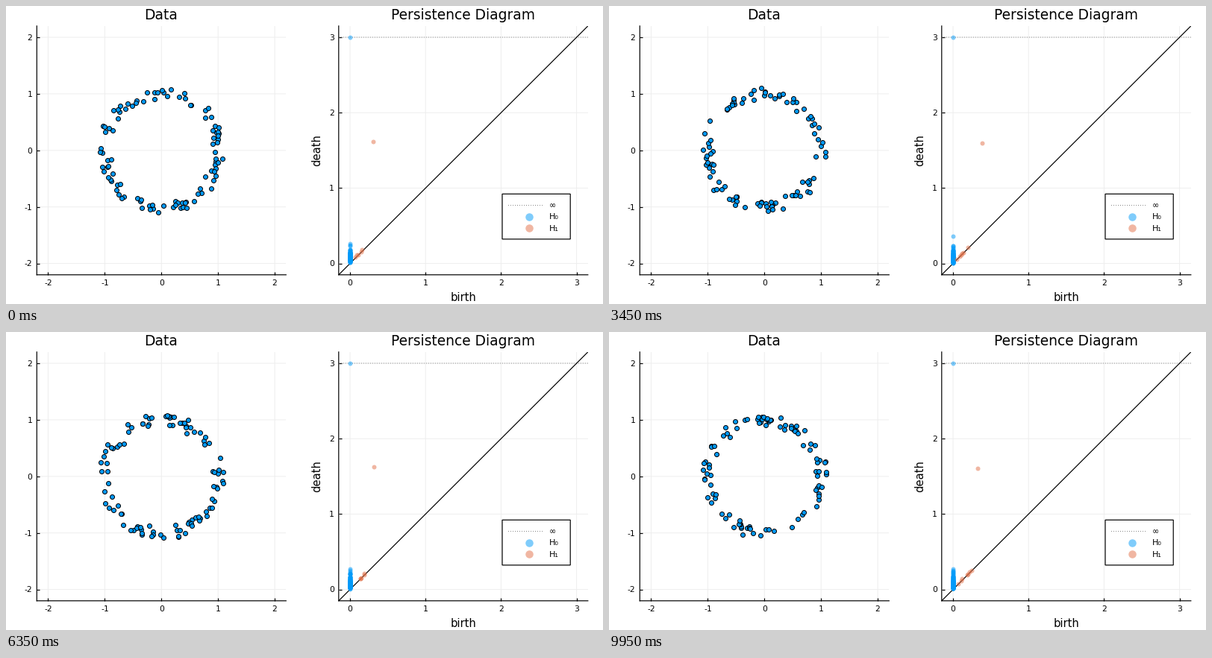
These frames come from a looping animation (800x400 px, 10000 ms). A matplotlib script:

```python
import itertools

import numpy as np
import matplotlib.pyplot as plt
from matplotlib.animation import FuncAnimation
from matplotlib.patches import Rectangle

W, H, DPI = 800, 400, 100
PX = 72 / DPI                      # points per pixel
FRAMES, INTERVAL = 200, 50
N, NOISE, INF = 100, 0.1, 3
CUT = 0.5                          # longest edge used for the small loops
TOP, SIDE = 26.8, 334              # panel square, in pixels
LINE = 1.2 * PX
BLUE, ORANGE = "#009af9", "#e26f46"
DOTTED = dict(color="#888888", lw=PX, ls=(0, (1, 2)), snap=False)
TRI = np.array(list(itertools.combinations(range(N), 3))).T
AB, BC, CA = (TRI[0] * N + TRI[1], TRI[1] * N + TRI[2], TRI[2] * N + TRI[0])

plt.rcParams["font.family"] = "DejaVu Sans"


def noisy_circle(seed):
    rng = np.random.default_rng(seed)
    t = rng.uniform(0, 2 * np.pi, N)
    return np.column_stack([np.sin(t), np.cos(t)]) + rng.uniform(-NOISE, NOISE, (N, 2))


def spanning_tree(dist, step):
    """Merge lengths of the components, and angles unwrapped along the tree."""
    best, parent = dist[0].copy(), np.zeros(N, int)
    lift, todo = np.zeros(N), np.ones(N, bool)
    todo[0] = False
    deaths = []
    for _ in range(N - 1):
        v = int(np.argmin(np.where(todo, best, np.inf)))
        todo[v] = False
        deaths.append(best[v])
        lift[v] = lift[parent[v]] + step[parent[v], v]
        closer = todo & (dist[v] < best)
        best[closer] = dist[v][closer]
        parent[closer] = v
    return deaths, lift


def big_loop(dist, step, lift):
    """Birth and death of the loop around the centre."""
    closes = np.abs(lift[None, :] - lift[:, None] - step) > np.pi
    s, d = step.ravel(), dist.ravel()
    around = np.abs(s[AB] + s[BC] + s[CA]) > np.pi
    longest = np.maximum(np.maximum(d[AB], d[BC]), d[CA])
    return dist[closes].min(), longest[around].min()


def small_loops(dist):
    """Short-lived loops: column reduction of Rips triangles over Z2."""
    i, j = np.triu_indices(N, 1)
    length = dist[i, j]
    order = [e for e in np.argsort(length) if length[e] < CUT]
    near = [{} for _ in range(N)]
    pivots, pairs = {}, []
    for k, e in enumerate(order):
        a, b = int(i[e]), int(j[e])
        for c in near[a].keys() & near[b].keys():
            col = 1 << k | 1 << near[a][c] | 1 << near[b][c]
            while col:
                p = col.bit_length() - 1
                if p not in pivots:
                    pivots[p] = col
                    if p != k:
                        pairs.append((length[order[p]], length[e]))
                    break
                col ^= pivots[p]
        near[a][b] = near[b][a] = k
    return pairs


def persistence(pts):
    diff = pts[:, None] - pts[None]
    dist = np.hypot(diff[..., 0], diff[..., 1])
    angle = np.arctan2(pts[:, 1], pts[:, 0])
    step = (angle[None, :] - angle[:, None] + np.pi) % (2 * np.pi) - np.pi
    deaths, lift = spanning_tree(dist, step)
    h1 = small_loops(dist) + [big_loop(dist, step, lift)]
    return deaths + [INF], np.array(h1)


fig = plt.figure(figsize=(W / DPI, H / DPI), dpi=DPI, facecolor="white")


def label(x, y, text, size, ha="center", **kw):
    fig.text(x / W, 1 - y / H, text, fontsize=size * PX, ha=ha, va="baseline", **kw)


def panel(left, lo, hi, ticks, title):
    ax = fig.add_axes([left / W, 1 - (TOP + SIDE) / H, SIDE / W, SIDE / H])
    ax.set(xlim=(lo, hi), ylim=(lo, hi), xticks=ticks, yticks=ticks)
    ax.spines[["top", "right"]].set_visible(False)
    for side in ("left", "bottom"):
        ax.spines[side].set(linewidth=LINE, snap=False)
    ax.tick_params(direction="in", length=4 * PX, width=LINE,
                   labelbottom=False, labelleft=False)
    ax.grid(color="#eeeeee", lw=PX, snap=False)
    ax.set_axisbelow(True)
    scale = SIDE / (hi - lo)
    for t in ticks:
        label(left + (t - lo) * scale, 375, str(t), 10.7)
        label(left - 6, TOP + (hi - t) * scale + 3.8, str(t), 10.7, ha="right")
    label(left + SIDE / 2 - 0.3, 18, title, 18.7)
    return ax


def dots(ax, color, size, **kw):
    return ax.plot([], [], "o", ms=size * PX, color=color, zorder=4, snap=False, **kw)[0]


def legend():
    ax = fig.add_axes([0, 0, 1, 1], xlim=(0, W), ylim=(H, 0))
    ax.axis("off")
    ax.add_patch(Rectangle((665, 252.3), 91.2, 60.6, fc="white", ec="black",
                           lw=LINE, snap=False))
    ax.plot([673, 720], [267.5, 267.5], **DOTTED)
    for y, color in ((282.5, BLUE), (297.6, ORANGE)):
        ax.plot(701, y, "o", ms=10.5 * PX, color=color, alpha=0.5, mew=0, snap=False)
    for y, text in ((271.5, "∞"), (286.5, "H₀"), (301.5, "H₁")):
        label(728, y, text, 11.1, ha="left")


data_ax = panel(41.3, -2.2, 2.2, range(-2, 3), "Data")
diag_ax = panel(445.8, -0.15, 3.15, range(4), "Persistence Diagram")
diag_ax.plot([-0.15, 3.15], [INF, INF], zorder=2, **DOTTED)
diag_ax.plot([-0.15, 3.15], [-0.15, 3.15], color="black", lw=LINE, zorder=3)
label(612.8, 396, "birth", 14.7)
label(421, 194, "death", 14.7, rotation=90, rotation_mode="anchor")
legend()

cloud = dots(data_ax, BLUE, 6, mec="black", mew=PX)
h0_dots = dots(diag_ax, BLUE, 6, alpha=0.5, mew=0)
h1_dots = dots(diag_ax, ORANGE, 6, alpha=0.5, mew=0)


def draw(frame):
    pts = noisy_circle(1000 + frame)
    h0, h1 = persistence(pts)
    cloud.set_data(pts[:, 0], pts[:, 1])
    h0_dots.set_data(np.zeros(N), h0)
    h1_dots.set_data(h1[:, 0], h1[:, 1])
    return cloud, h0_dots, h1_dots


anim = FuncAnimation(fig, draw, frames=FRAMES, interval=INTERVAL,
                     init_func=lambda: draw(0), repeat=True, repeat_delay=0)
plt.show()
```
